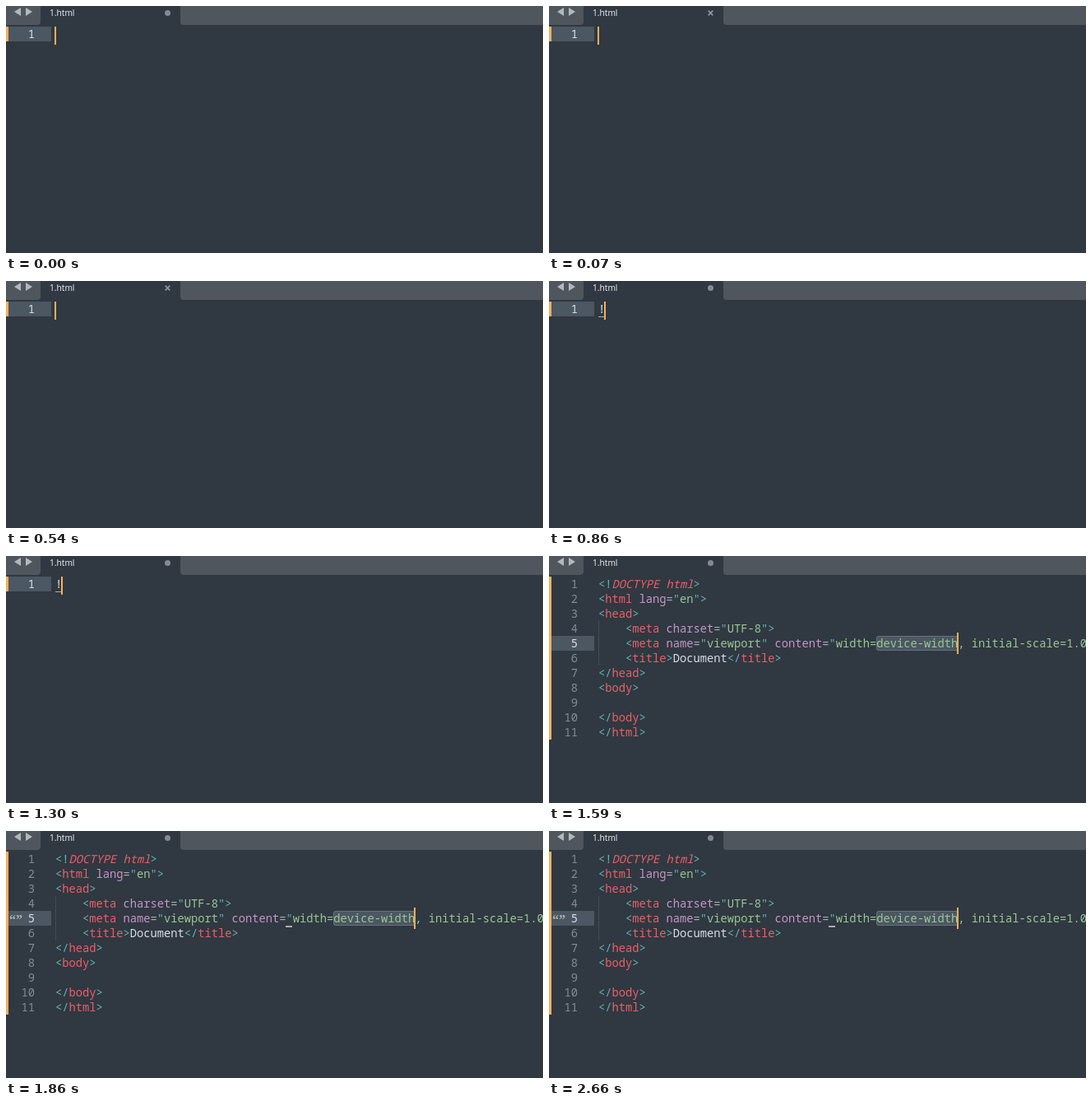
Recreate the animation shown at these times as an HTML page with a canvas. Size 653x300 px, loop 3.2 s.

```html
<!DOCTYPE html>
<html lang="en">
<head>
<meta charset="UTF-8">
<style>
html, body { margin: 0; height: 100%; overflow: hidden; background: #303841; }
canvas { display: block; }
</style>
</head>
<body>
<canvas id="stage" width="653" height="300"></canvas>
<script>
const ctx = document.getElementById('stage').getContext('2d');
const LOOP = 3200, CHAR = 8.25, ROW = 18, LEFT = 60, TOP = 25;
const MONO = '13.75px "Noto Sans Mono", "DejaVu Sans Mono", monospace';
const ORANGE = '#f9ae58', WHITE = '#d8dee9', BACK = '#303841', BAR = '#4f565d';
const lines = `<!DOCTYPE html>
<html lang="en">
<head>
    <meta charset="UTF-8">
    <meta name="viewport" content="width=device-width, initial-scale=1.0">
    <title>Document</title>
</head>
<body>

</body>
</html>`.split('\n');

// Token kinds, in the order of the groups in the pattern
const pattern = /(<[!\/]?|[>"])|((?<=<!)[^>]+)|((?<=<\/?)\w+)|((?<==")[^"]+)|(\w+(?==))|(=)|([^<\s]+)/g;
const colors = ['#5fb4b4', '#ec5f66', '#ec5f66', '#99c794', '#c695c6', '#a6acb9', WHITE];

function rect(x, y, w, h, color) {
  ctx.fillStyle = color;
  ctx.fillRect(x, y, w, h);
}

function rounded(x, y, w, h, radii, color) {
  ctx.fillStyle = color;
  ctx.beginPath();
  ctx.roundRect(x, y, w, h, radii);
  ctx.fill();
}

function text(str, x, y, color, font = MONO, align = 'left') {
  ctx.font = font;
  ctx.textAlign = align;
  ctx.fillStyle = color;
  ctx.fillText(str, x, y);
}

function arrow(tip, base) {
  ctx.fillStyle = '#b3b8be';
  ctx.beginPath();
  ctx.moveTo(tip, 7);
  ctx.lineTo(base, 2);
  ctx.lineTo(base, 12);
  ctx.fill();
}

function drawTabs(saved) {
  rounded(0, 0, 42, 23, [0, 0, 4, 0], BAR);
  rounded(212, 0, 441, 23, [0, 0, 0, 4], BAR);
  arrow(10, 18);
  arrow(32, 24);
  text('1.html', 53, 12, '#f4f6f8', '10.2px "Open Sans", sans-serif');
  if (saved) {
    ctx.strokeStyle = '#8f959b';
    ctx.lineWidth = 1.7;
    ctx.beginPath();
    ctx.moveTo(193.7, 5.7);
    ctx.lineTo(199.3, 11.3);
    ctx.moveTo(199.3, 5.7);
    ctx.lineTo(193.7, 11.3);
    ctx.stroke();
  } else {
    rounded(193, 5, 7, 7, 3.5, '#848a90');
  }
}

function drawGutter(count, current) {
  rect(0, TOP + (current - 1) * ROW, 55, ROW, '#4b5762');
  rect(0, TOP, 3, count * ROW, ORANGE);
  for (let n = 1; n <= count; n++)
    text(n, 35, TOP + 14 + (n - 1) * ROW, n === current ? WHITE : '#848b95', MONO, 'right');
}

function drawCode() {
  for (let y = 79; y < 133; y += 2) rect(60, y, 1, 1, '#56616c');
  rounded(398, 97, 100, 18, 3, '#65717b');
  rounded(399, 98, 98, 16, 2, '#4b5762');
  lines.forEach((line, row) => {
    for (const match of line.matchAll(pattern)) {
      const kind = match.slice(1).findIndex(group => group !== undefined);
      text(match[0], LEFT + match.index * CHAR, TOP + 14 + row * ROW,
        colors[kind], (kind === 1 ? 'italic ' : '') + MONO);
    }
  });
}

function draw(t) {
  rect(0, 0, 653, 300, BACK);
  drawTabs(t >= 70 && t < 860);
  if (t < 1590) {
    const typed = t >= 860;
    drawGutter(1, 1);
    if (typed) {
      text('!', LEFT, 39, WHITE);
      rect(60, 43, 8, 1, '#a5b5a4');
    }
    rect(typed ? 67 : 59, TOP, 2, 22, ORANGE);
  } else {
    drawGutter(lines.length, 5);
    drawCode();
    rect(496, 93, 2, 26, ORANGE);
    if (t >= 1860) {
      text('“”', 4, 113, '#a5b5a4', 'bold 16px "Liberation Serif", serif');
      rect(340, 115, 8, 2, '#a5b5a4');
    }
  }
}

function tick() {
  draw(performance.now() % LOOP);
  requestAnimationFrame(tick);
}
tick();
</script>
</body>
</html>
```
